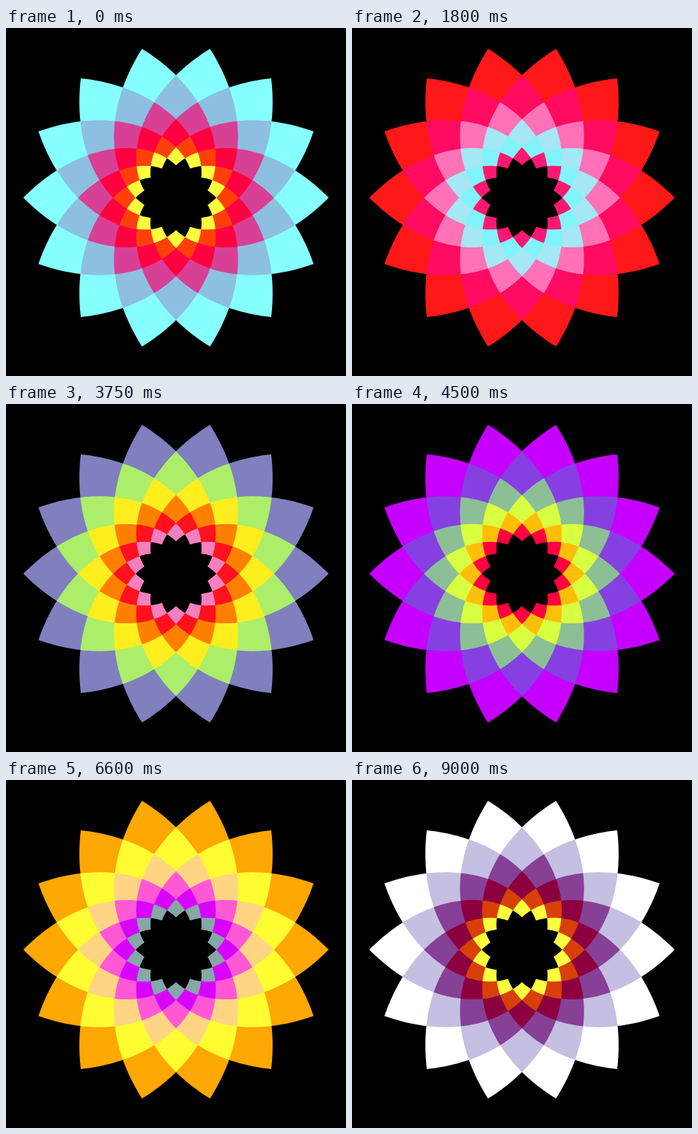
An HTML page with a canvas for the animation above (9.15 s loop, 473 by 484 pixels).

```html
<!DOCTYPE html>
<html lang="en">
<head>
<meta charset="utf-8">
<title>Flower</title>
<style>
html, body { margin: 0; width: 100%; height: 100%; overflow: hidden; background: #000; }
canvas { display: block; }
</style>
</head>
<body>
<canvas id="stage" width="473" height="484"></canvas>
<script>
const ctx = document.getElementById('stage').getContext('2d');
const CX = 236.5, CY = 236, RADIUS = 212.4;
const PETALS = 14, RATIO = 0.801;
const HALF = Math.PI / PETALS;
const STEP = 150, LOOP = 9150;
const INDEX = [0, 1, 2, 3, 4, 6]; // colour position of each ring

// Star bounded by logarithmic spirals; each level is turned by half a petal.
function star(level) {
  const path = new Path2D(), parts = 10;
  for (let n = 0; n < PETALS * 2 * parts; n++) {
    const q = n / parts;
    const depth = 1 - Math.abs(q % 2 - 1);
    const r = RADIUS * RATIO ** (level + depth);
    const a = (q + level) * HALF;
    path.lineTo(CX + r * Math.cos(a), CY + r * Math.sin(a));
  }
  path.closePath();
  return path;
}

const stars = Array.from({ length: 7 }, (_, level) => star(level));

// Three cosine waves of different length travel inward through the rings.
function colour(u) {
  const wave = (period, shift) => Math.cos(2 * Math.PI * (u + shift) / period);
  const r = Math.min(1, 1 + 0.5 * wave(8, 3.6));
  const g = 0.5 + 0.5 * wave(6, 0);
  const b = 0.5 + 0.5 * wave(9, 0);
  return `rgb(${[r, g, b].map(v => Math.round(v * 255)).join(',')})`;
}

let shown = -1;

function draw(step) {
  ctx.fillStyle = '#000';
  ctx.fillRect(0, 0, 473, 484);
  stars.forEach((path, level) => {
    ctx.fillStyle = level < INDEX.length ? colour(INDEX[level] - 0.3 * step) : '#000';
    ctx.fill(path);
  });
}

const start = performance.now();

function tick() {
  const t = Math.max(0, performance.now() - start) % LOOP;
  const step = Math.floor(t / STEP);
  if (step !== shown) draw(shown = step);
  requestAnimationFrame(tick);
}
tick();
</script>
</body>
</html>
```
